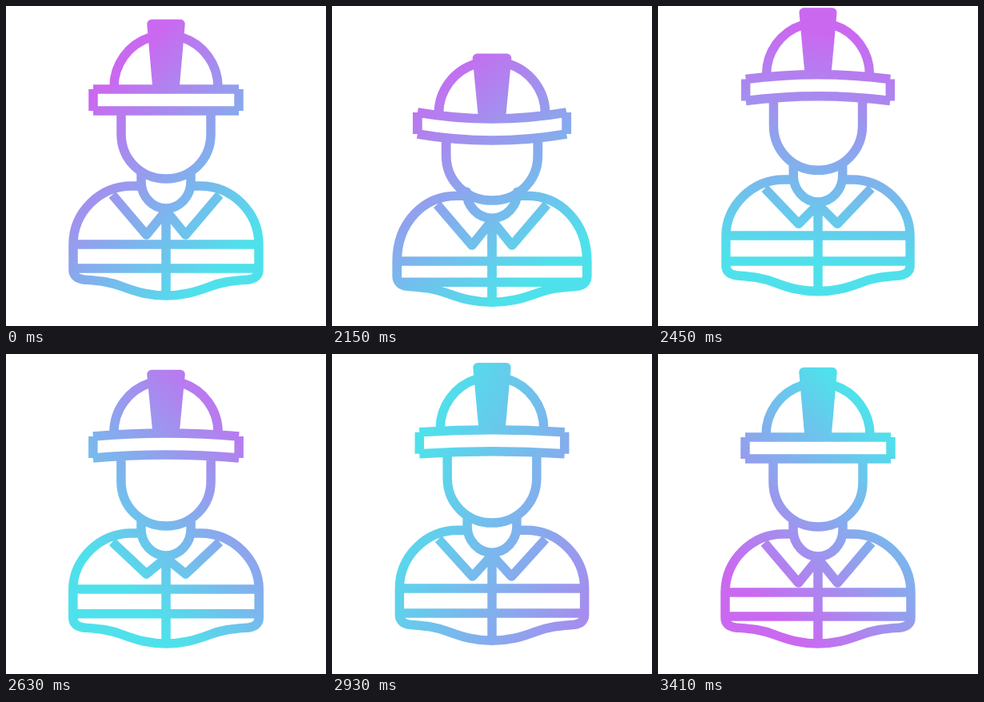
Recreate the animation shown at these times as an HTML page with a canvas. Size 400 px wide and 400 px high, loop 3440 ms.

```html
<!DOCTYPE html>
<html lang="en">
<head>
<meta charset="utf-8">
<title>Construction worker icon</title>
<style>
  html, body { margin: 0; overflow: hidden; background: #fff; }
  canvas { display: block; width: 400px; height: 400px; }
</style>
</head>
<body>
<canvas id="stage" width="400" height="400"></canvas>
<script>
const ctx = document.getElementById('stage').getContext('2d');
const LOOP = 3440, HOLD = 2030, STEP = 30;
const PURPLE = '#ca69f0', CYAN = '#4fe1eb';

// time, then vertical shift of: hat top, brim ends, brim middle, chin, shoulders, lapel tips, stripes, hem
const POSES = [
  [2000, 0, 0, 0, 0, 0, 0, 0, 0],
  [2030, 6, 5, 5, 5, 4, 3, 3, 3],
  [2130, 44, 30, 38, 28, 13, 14, 22, 9],
  [2270, 11, 4, 9, 4, -4, -6, 0, -4],
  [2370, -17, -14, -20, -12, -9, -14, -12, -6],
  [2630, 3, -1, -5, -1, -1, -11, -4, 0],
  [2780, 44, 30, 38, 28, 13, 14, 22, 9],
  [2980, -15, -13, -18, -11, -8, -12, -10, -6],
  [3080, -2, -2, -2, -2, -2, 0, -3, -2],
  [3180, 2, 2, 2, 2, 2, 1, 2, 2],
  [3320, 0, 0, 0, 0, 0, 0, 0, 0]
];

// time, direction towards purple (degrees), slope per 100 px, mix at the centre
const TINTS = [
  [2000, -135, .38, .53],
  [2270, -113, .34, .47],
  [2630, -45, .36, .37],
  [2780, -14, .2, .28],
  [3080, 60, .33, .34],
  [3410, 135, .38, .51]
];

// Smooth interpolation without overshoot
function sample(keys, t) {
  const last = keys.length - 1;
  if (t >= keys[last][0]) return keys[last].slice(1);
  let i = 0;
  while (t >= keys[i + 1][0]) i++;
  const rate = (k, c) => (keys[k + 1][c] - keys[k][c]) / (keys[k + 1][0] - keys[k][0]);
  const slope = (k, c) => {
    if (k === 0 || k === last) return 0;
    const a = rate(k - 1, c), b = rate(k, c);
    return a * b > 0 ? 2 * a * b / (a + b) : 0;
  };
  const from = keys[i], to = keys[i + 1], span = to[0] - from[0];
  const u = (t - from[0]) / span, v = 1 - u;
  return from.map((a, c) =>
    v * v * (1 + 2 * u) * a + u * u * (3 - 2 * u) * to[c] +
    span * u * v * (v * slope(i, c) - u * slope(i + 1, c))
  ).slice(1);
}

// Left half of a shape plus its reflection about x = 200
function mirrored(d) {
  const half = new Path2D(d), whole = new Path2D(half);
  whole.addPath(half, new DOMMatrix([-1, 0, 0, 1, 400, 0]));
  return whole;
}

function tint(t) {
  const [angle, slope, mix] = sample(TINTS, t);
  const a = angle * Math.PI / 180;
  const at = m => {
    const r = (m - mix) * 100 / slope;
    return [200 + r * Math.cos(a), 200 + r * Math.sin(a)];
  };
  const g = ctx.createLinearGradient(...at(0), ...at(1));
  g.addColorStop(0, CYAN);
  g.addColorStop(1, PURPLE);
  return g;
}

function draw(t) {
  const [hat, edge, mid, chin, shoulder, tip, stripe, hem] = sample(POSES, t);
  const dome = (edge + mid) / 2, low = stripe * .82;
  const brim = y => `M109 ${y + edge}Q154.5 ${y + mid} 200 ${y + mid}`;

  const plume = mirrored(`M200 ${22.5 + hat}H182L189 ${102 + mid}H200`);
  const lines = mirrored(`
    M135 ${102 + dome}V${101 + dome}A65 65 0 0 1 180 ${39.2 + dome}
    ${brim(104)}${brim(131)}M109 ${104 + edge}V${131 + edge}
    M144 ${133 + dome}V${160 + chin}C144 ${192 + chin} 169 ${216 + chin} 200 ${216 + chin}
    M169 ${208 + chin}L169 ${220 + shoulder}C169 ${238 + shoulder} 183 ${253 + shoulder} 200 ${253 + shoulder}
    M133 ${236 + shoulder}L175.5 ${286 + tip}L200 ${256 + shoulder}V${362 + hem}
    M169 ${225 + shoulder}H157C117 ${225 + shoulder} 84 ${258 + shoulder} 84 ${298 + stripe}
    V${330 + hem}C84 ${337 + hem} 89 ${341 + hem} 97 ${342 + hem}
    C115 ${343.5 + hem} 128 ${344 + hem} 146 ${351 + hem}
    C165 ${358 + hem} 180 ${362 + hem} 200 ${362 + hem}
    M84 ${298 + stripe}H200M84 ${328 + low}H200`);

  ctx.setTransform(1, 0, 0, 1, 0, 0);
  ctx.fillStyle = '#fff';
  ctx.fillRect(0, 0, 400, 400);
  const wide = 1 + hat * .00055;
  ctx.setTransform(wide, 0, 0, 1, 200 - 200 * wide, 0);
  ctx.fillStyle = ctx.strokeStyle = tint(t);
  ctx.lineWidth = 11.5;
  ctx.lineJoin = 'round';
  ctx.stroke(lines);
  ctx.fill(plume);
  ctx.stroke(plume);
}

function frame(now) {
  const t = now % LOOP;
  draw(t < HOLD ? 2000 : HOLD + STEP * Math.floor((t - HOLD) / STEP));
  requestAnimationFrame(frame);
}
requestAnimationFrame(frame);
</script>
</body>
</html>
```
